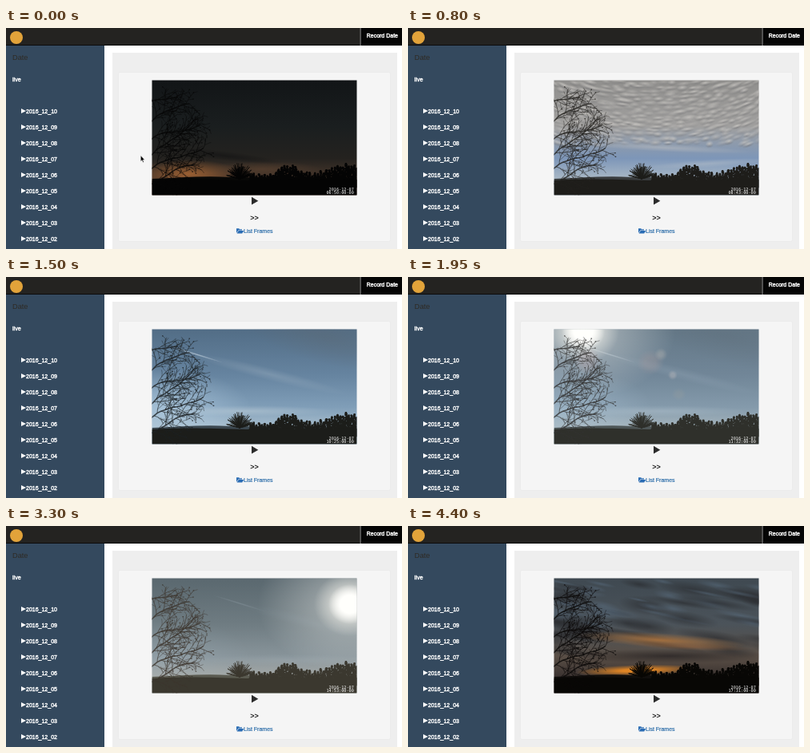
These frames come from a looping animation (495 px wide and 277 px high, 4.45 s). An HTML page with a canvas:

```html
<!DOCTYPE html>
<html lang="en">
<head>
<meta charset="utf-8">
<title>Record Date</title>
<style>
html, body { margin: 0; width: 100%; height: 100%; overflow: hidden; background: #fff; }
svg { position: absolute; left: 0; top: 0; display: block; }
canvas { position: absolute; left: 182px; top: 65px; display: block; }
text { font: 7px "Liberation Sans", Arial, sans-serif; }
.light { fill: #fff; stroke: #fff; stroke-width: .4px; }
</style>
</head>
<body>
<svg width="495" height="277" viewBox="0 0 495 277">
  <rect width="495" height="277" fill="#fff"/>
  <rect y="22" width="123" height="255" fill="#34495e"/>
  <rect x="133" y="31" width="356" height="246" fill="#eee"/>
  <rect x="140.5" y="55.5" width="340" height="212" rx="2" fill="#f5f5f5" stroke="#ebebeb"/>
  <rect width="495" height="22" fill="#242321"/>
  <rect y="21" width="495" height="1" fill="#0b0b0b"/>
  <rect x="443" width="52" height="22" fill="#050505"/>
  <rect x="442.7" width=".8" height="22" fill="#aaa"/>
  <circle cx="13" cy="12" r="8" fill="#e2a33a"/>
  <text class="light" x="450.7" y="12.2">Record Date</text>
  <text x="8" y="39.6" fill="#2f2b25" style="font-size:9.2px">Date</text>
  <text class="light" x="8" y="66.6" style="font-size:7.2px">live</text>
  <g id="dates"></g>
  <path d="M307 211.8L315.3 216.7L307 221.6Z" fill="#2b2b2b"/>
  <text x="305.2" y="241" fill="#222" style="font-size:9px;font-weight:bold">&gt;&gt;</text>
  <path d="M288 257V251.3H291.2L292 252.2H295V253.5H290.4ZM288.6 257.4L290.7 254H297.3L295.2 257.4Z" fill="#2a6cb4"/>
  <text x="297" y="256.6" fill="#2a6ca8" stroke="#2a6ca8" stroke-width=".2">List Frames</text>
  <path id="cursor" d="M168.3 159.8V167.2L170 165.7L171.2 168.4L172.3 167.9L171.2 165.3H173.4Z" fill="#000" stroke="#fff" stroke-width=".5"/>
</svg>
<canvas id="photo" width="258" height="146"></canvas>
<script>
const LOOP = 4450, STEP = 50;
const L = 182.5, T = 65.5, R = 438.5, B = 209.5;
const ctx = document.getElementById('photo').getContext('2d');
const cursor = document.getElementById('cursor');

document.getElementById('dates').innerHTML = Array.from({ length: 9 }, (_, i) => {
  const y = 104 + i * 20;
  return `<path d="M19 ${y - 2.9}L25 ${y}L19 ${y + 2.9}Z" fill="#fff"/>` +
    `<text class="light" x="25" y="${y + 2.6}">2016_12_${String(10 - i).padStart(2, '0')}</text>`;
}).join('');

// c: four sky stops, hills, foreground, branches
const moods = [
  { t: 0, m: 410, c: '121517 1a1e1f 24221f 4a382c 080807 040404 070707', ember: 1 },
  { t: 350, m: 459, c: '4b535b 656c72 7c7d80 b09a84 22211f 121210 141412', ember: .35, ripple: .4 },
  { t: 800, m: 523, c: '908f8d a09f9e 7d96b8 a9b8c6 3a3d3f 1e1d1a 24221f', ripple: 1 },
  { t: 1500, m: 625, c: '526d86 6684a0 809eb8 a9bfce 3c4850 1c1d1a 1d2124', streak: 1 },
  { t: 2500, m: 773, c: '7b8589 7e898f 89949a a2a8a8 65675f 47473f 4f4a42', streak: .25, sun: 1 },
  { t: 3300, m: 893, c: '5a686f 6f7c82 88949a a5a9a7 5a5a50 3b382f 3c352d', streak: .25, sun: 1 },
  { t: 3800, m: 970, c: '5e7183 76889a 939fa8 c6bb9c 37362e 171613 27221d', bank: 1 },
  { t: 4400, m: 1051, c: '3f4951 4b535a 5a4f46 3a3230 100e0c 080705 0b0908', dusk: 1 },
];
for (const k of moods) {
  k.c = k.c.split(' ').map(h => [0, 2, 4].map(i => parseInt(h.slice(i, i + 2), 16)));
}

const mix = (a, b, p) => a + (b - a) * p;
const clamp = v => Math.max(0, Math.min(1, v));
const rgb = (c, a = 1) => `rgba(${c.map(Math.round)},${a})`;

function seeded(s) {
  return () => {
    s = (s * 1664525 + 1013904223) >>> 0;
    return s / 4294967296;
  };
}

function moodAt(t) {
  let i = 0;
  while (i < moods.length - 2 && t >= moods[i + 1].t) i++;
  const a = moods[i], b = moods[i + 1], p = clamp((t - a.t) / (b.t - a.t));
  const out = { m: Math.round(mix(a.m, b.m, p)) };
  out.c = a.c.map((col, j) => col.map((v, n) => mix(v, b.c[j][n], p)));
  for (const k of ['ember', 'ripple', 'streak', 'sun', 'bank', 'dusk']) out[k] = mix(a[k] || 0, b[k] || 0, p);
  return out;
}

// Soft-edged ellipse
function soft(x, y, rx, ry, col, alpha, turn = 0, core = 0) {
  if (alpha < .01) return;
  ctx.save();
  ctx.translate(x, y);
  ctx.rotate(turn);
  ctx.scale(rx, ry);
  const g = ctx.createRadialGradient(0, 0, core, 0, 0, 1);
  g.addColorStop(0, rgb(col, alpha));
  g.addColorStop(1, rgb(col, 0));
  ctx.fillStyle = g;
  ctx.fillRect(-1, -1, 2, 2);
  ctx.restore();
}

// Bare tree on the left: limbs that shed twigs on alternate sides
const twigs = [new Path2D(), new Path2D(), new Path2D()], leaves = new Path2D();
const grow = seeded(41);
function limb(x, y, ang, len, level) {
  const steps = Math.max(3, Math.round(len / 5)), bit = len / steps, p = twigs[level];
  p.moveTo(x, y);
  for (let i = 1; i <= steps; i++) {
    ang += (grow() - .5) * .45;
    x += Math.cos(ang) * bit;
    y += Math.sin(ang) * bit;
    p.lineTo(x, y);
    if (level < 2) {
      const side = i % 2 ? 1 : -1, size = (level ? 5 : 15) + len * .28 * (1 - i / steps);
      limb(x, y, ang + side * (.45 + grow() * .5), size * (.7 + grow() * .5), level + 1);
      p.moveTo(x, y);
    }
  }
  if (level && grow() < .3) leaves.rect(x - .7, y - .6, 1.5, 1.3);
}
limb(181, 196, -.35, 62, 0);
limb(181, 177, -.6, 72, 0);
limb(181, 160, -.6, 74, 0);
limb(181, 140, -.75, 66, 0);
limb(181, 118, -.85, 55, 0);
limb(181, 92, -.5, 34, 0);

// Fan-shaped bush and the tree line on the right
const bush = new Path2D(), woods = new Path2D(), plant = seeded(9);
for (let i = 0; i < 80; i++) {
  const a = -Math.PI * (.06 + .88 * plant()), len = 11 + plant() * 7;
  bush.moveTo(292, 189);
  bush.lineTo(292 + Math.cos(a) * len, 189 + Math.sin(a) * len * 1.15);
}
function fir(x, top, w) {
  for (let y = top; y < 200; y += 1.5) {
    const half = w * Math.min(1, .1 + (y - top) / 13);
    for (let i = 0; i < 4; i++) {
      const px = x + (plant() * 2 - 1) * half, r = .6 + plant() * 1.1;
      woods.moveTo(px + r, y);
      woods.arc(px, y, r, 0, 7);
    }
  }
}
for (let x = 306; x < 441; x += 3.5) {
  const rise = 12 * Math.exp(-(((x - 354) / 13) ** 2)) + 12 * Math.exp(-(((x - 424) / 25) ** 2));
  fir(x, 187 - rise - plant() * 5, 3.8);
}

const ripples = [], scatter = seeded(73);
for (let row = 0; row < 15; row++) {
  for (let col = 0; col < 25; col++) {
    ripples.push({
      x: col * 13 + row * 5 + scatter() * 9,
      y: 66 + row * 5.4 + scatter() * 4,
      w: 5 + scatter() * 6, h: 2 + scatter() * 1.6, a: .2 + scatter() * .35,
    });
  }
}
const lumps = Array.from({ length: 34 }, () => ({
  x: scatter() * 320, y: scatter(), w: 22 + scatter() * 42, h: 3 + scatter() * 7,
}));
const wrap = (x, span) => L - 35 + (((x % span) + span) % span);

function drawClouds(s, t) {
  for (const r of ripples) {
    const x = wrap(r.x + (t - 800) * .05, 325), turn = (300 - x) * .003;
    soft(x, r.y + 2.2, r.w, r.h, [112, 112, 114], r.a * s.ripple, turn);
    soft(x, r.y, r.w, r.h, [212, 209, 204], r.a * 1.25 * s.ripple, turn);
  }
  soft(320, 150, 110, 5, [190, 192, 194], .5 * s.ripple, .05);
  soft(375, 170, 80, 5, [180, 190, 200], .5 * s.ripple, -.06);

  const d = (t - 1500) * .03;
  soft(196, 165, 110, 50, [190, 216, 235], .6 * s.streak);
  soft(400, 75, 110, 34, [92, 106, 118], .5 * s.streak, .25);
  soft(238 + d, 97, 36, 1.3, [200, 214, 226], .7 * s.streak, .3);
  soft(330 + d, 122, 100, 8, [160, 178, 194], .35 * s.streak, .25);
  soft(300 + d, 168, 110, 7, [190, 206, 216], .5 * s.streak);

  for (const l of lumps) {
    const x = wrap(l.x + (t - 3800) * .045, 320);
    soft(x, 71 + l.y * 70, l.w, l.h, [146, 154, 158], .45 * s.bank, .22);
    soft(x, 153 + l.y * 22, l.w * .9, l.h * .6, [236, 225, 194], .55 * s.bank, -.06);
  }
  soft(365, 158, 120, 9, [240, 231, 206], .8 * s.bank, -.08);

  if (s.dusk > .01) {
    for (const l of lumps) {
      const x = wrap(l.x + (t - 4400) * .045, 320);
      soft(x, 72 + l.y * 94, l.w, l.h * 1.2, [38, 39, 42], .6 * s.dusk, .16);
      soft(x + 30, 69 + l.y * 60, l.w * .6, l.h * .6, [91, 112, 132], .45 * s.dusk, .2);
    }
    soft(315, 143, 108, 9, [190, 122, 58], .75 * s.dusk, .06);
    soft(350, 151, 80, 5, [139, 95, 61], .65 * s.dusk, .04);
    soft(325, 163, 130, 9, [43, 39, 39], .85 * s.dusk);
    soft(286, 181, 76, 7, [232, 137, 36], .95 * s.dusk, -.03, .25);
  }
  soft(228, 183, 66, 18, [170, 103, 52], .85 * s.ember);
  soft(320, 177, 75, 10, [93, 67, 48], .65 * s.ember);
  soft(272, 160, 75, 6, [22, 22, 22], .8 * s.ember, .12);
}

function drawSun(t) {
  const a = clamp((t - 1600) / 350) * clamp((3600 - t) / 250);
  if (!a) return;
  const x = 305 + (t - 2500) * .156, y = 67 + 2.3e-5 * (t - 2140) ** 2, dx = x - 305;
  soft(x, y, 115, 85, [225, 227, 224], .6 * a);
  soft(x, y, 45, 40, [255, 252, 243], .9 * a);
  soft(x, y, 27, 25, [255, 255, 252], a, 0, .45);
  const flare = a * clamp(1 - Math.abs(dx) / 125);
  soft(267 + dx * .5, 105, 17, 17, [211, 157, 151], .55 * flare, 0, .4);
  soft(346 + dx * .5, 107, 17, 16, [207, 161, 153], .5 * flare, 0, .4);
  soft(299 - dx * .2, 97, 8, 8, [238, 220, 200], .65 * flare, 0, .3);
  soft(288 - dx * .5, 123, 6, 6, [238, 219, 211], .75 * flare, 0, .4);
  soft(270 - dx * .8, 147, 9, 8, [184, 172, 150], .4 * flare, 0, .4);
}

function drawLand(s) {
  const [hill, ground, bark] = s.c.slice(4);
  ctx.fillStyle = rgb(hill);
  ctx.beginPath();
  ctx.moveTo(L, 189);
  ctx.bezierCurveTo(215, 188, 245, 185, 280, 187);
  ctx.bezierCurveTo(330, 188, 390, 186, R, 190);
  ctx.lineTo(R, B);
  ctx.lineTo(L, B);
  ctx.fill();
  ctx.fillStyle = ctx.strokeStyle = rgb(ground);
  ctx.lineWidth = .8;
  ctx.stroke(bush);
  ctx.fill(woods);
  ctx.beginPath();
  ctx.moveTo(L, 191);
  ctx.bezierCurveTo(230, 188, 255, 190, 300, 191);
  ctx.lineTo(R, 190);
  ctx.lineTo(R, B);
  ctx.lineTo(L, B);
  ctx.fill();
  ctx.strokeStyle = ctx.fillStyle = rgb(bark, .8);
  twigs.forEach((p, i) => {
    ctx.lineWidth = [1.5, .8, .5][i];
    ctx.stroke(p);
  });
  ctx.fill(leaves);
}

function drawStamp(m) {
  const two = n => String(n).padStart(2, '0');
  ctx.fillStyle = '#fff';
  ctx.font = '5.2px "DejaVu Sans Mono", monospace';
  ctx.textAlign = 'right';
  ctx.fillText('2016-12-07', 434.8, 203.8);
  ctx.fillText(`${two(Math.floor(m / 60))}:${two(m % 60)}:00-00`, 434.8, 208.4);
}

function draw(t) {
  const s = moodAt(t);
  ctx.setTransform(1, 0, 0, 1, -182, -65);
  ctx.clearRect(182, 65, 258, 146);
  ctx.save();
  ctx.beginPath();
  ctx.rect(L, T, R - L, B - T);
  ctx.clip();
  const sky = ctx.createLinearGradient(0, T, 0, B);
  [0, .4, .68, .86].forEach((p, i) => sky.addColorStop(p, rgb(s.c[i])));
  ctx.fillStyle = sky;
  ctx.fillRect(182, 65, 258, 146);
  drawClouds(s, t);
  drawSun(t);
  drawLand(s);
  drawStamp(s.m);
  ctx.restore();
  cursor.style.display = t < STEP ? '' : 'none';
}

const start = performance.now();
let shown = -1;
function tick() {
  const now = Math.max(0, performance.now() - start) % LOOP;
  const t = Math.floor(now / STEP) * STEP;
  if (t !== shown) draw(shown = t);
  requestAnimationFrame(tick);
}
tick();
</script>
</body>
</html>
```
